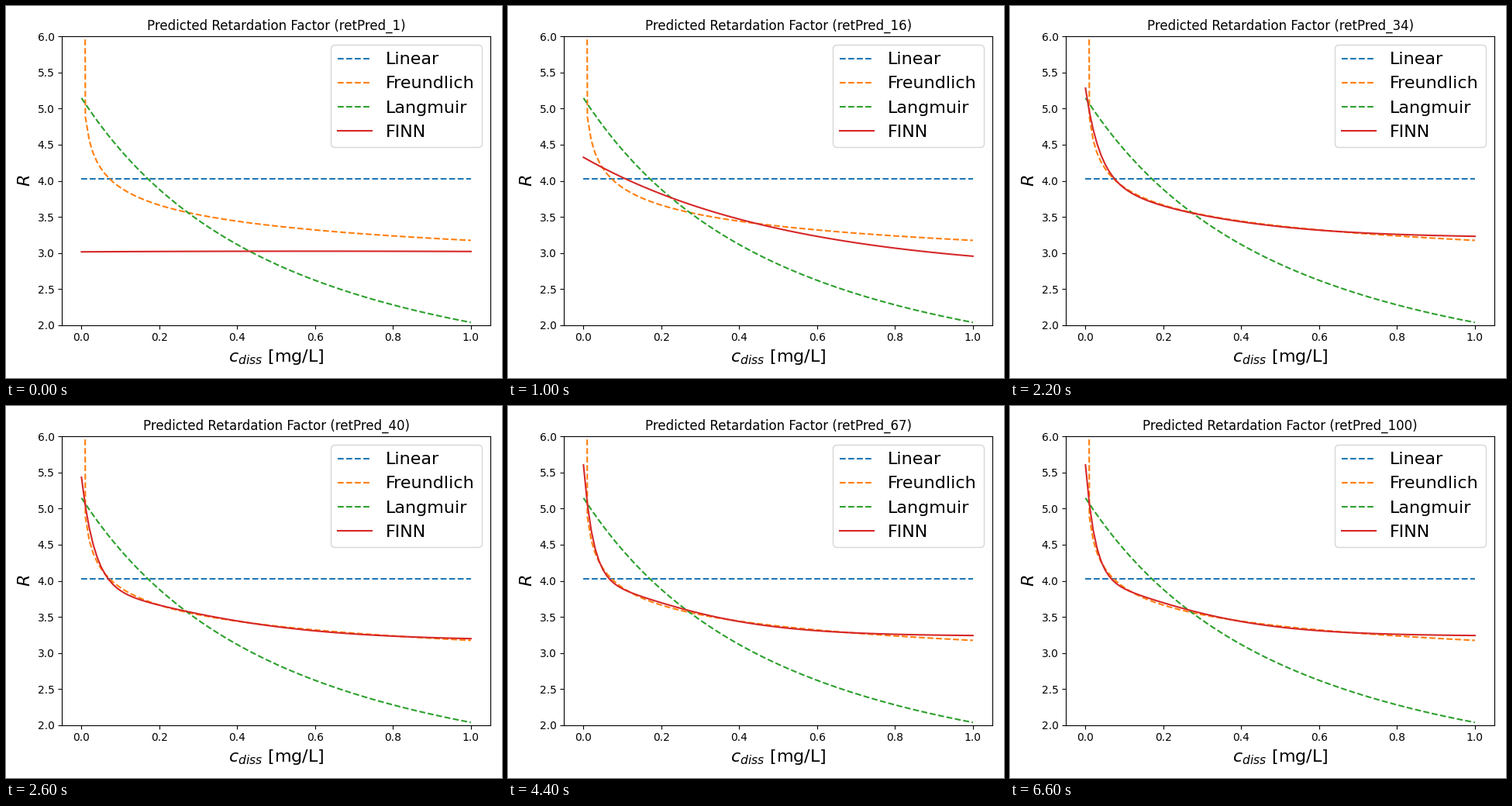
A matplotlib script that plays this animation: 640 px wide and 480 px high, repeating every 6800 ms.

```python
import numpy as np
import matplotlib.pyplot as plt
from matplotlib.animation import FuncAnimation

FRAMES, INTERVAL = 34, 200
EPOCH_STEP = 3

# Sorption isotherm parameters
POROSITY, DENSITY = 0.29, 2880
RATIO = (1 - POROSITY) / POROSITY
K_D = 0.429 / 1000
K_F, N_F = 1.016 / DENSITY, 0.874
S_MAX, K_HALF = 1 / 1700, 1.0

c = np.linspace(0, 1, 101)
linear = np.full_like(c, 1 + RATIO * DENSITY * K_D)
freundlich = 1 + RATIO * DENSITY * K_F * N_F * (c + 1e-8) ** (N_F - 1)
langmuir = 1 + RATIO * DENSITY * S_MAX * K_HALF / (c + K_HALF) ** 2


def decay(height, length):
    return height * np.exp(-c / length)


def falloff(height, center, width):
    return height / (1 + np.exp((c - center) / width))


# (step, easing, curve): the network's estimate while it trains
STAGES = [
    (0, 0, 3.015 + 0.03 * c - 0.025 * c ** 2),
    (3, 0, 2.17 + decay(1.63, 1)),
    (5, 0, 2.712 + decay(1.613, 0.528)),
    (8, 0, 3.3 + decay(0.86, 0.068) + decay(0.776, 0.2)),
    (13, 0.4, 3.17 + decay(1.525, 0.034) + falloff(1.227, 0.1, 0.24)),
    (18, 0.8, 3.233 + decay(1.575, 0.0245) + falloff(1.24, 0.106, 0.18)),
]


def prediction(step):
    for (s0, _, a), (s1, ease, b) in zip(STAGES, STAGES[1:]):
        if step <= s1:
            u = (step - s0) / (s1 - s0)
            u += ease * u * (1 - u)
            return a + (b - a) * u
    return STAGES[-1][2]


def heading(step):
    return f"Predicted Retardation Factor (retPred_{1 + EPOCH_STEP * step})"


fig, ax = plt.subplots(figsize=(6.4, 4.8), dpi=100)
for curve, label in [(linear, "Linear"), (freundlich, "Freundlich"),
                     (langmuir, "Langmuir")]:
    ax.plot(c, curve, "--", label=label)
finn, = ax.plot(c, prediction(0), label="FINN")

ax.set_xlim(-0.05, 1.05)
ax.set_ylim(2, 6)
ax.set_xlabel("$c_{diss}$ [mg/L]", fontsize=16)
ax.set_ylabel("$R$", fontsize=16)
title = ax.set_title(heading(0))
ax.legend(loc="upper right", fontsize=16)
fig.tight_layout()
fig.subplots_adjust(top=1 - 39.33 / 480)


def update(step):
    finn.set_ydata(prediction(step))
    title.set_text(heading(step))
    return finn, title


anim = FuncAnimation(fig, update, frames=FRAMES, interval=INTERVAL,
                     repeat=True, repeat_delay=0)
plt.show()
```
